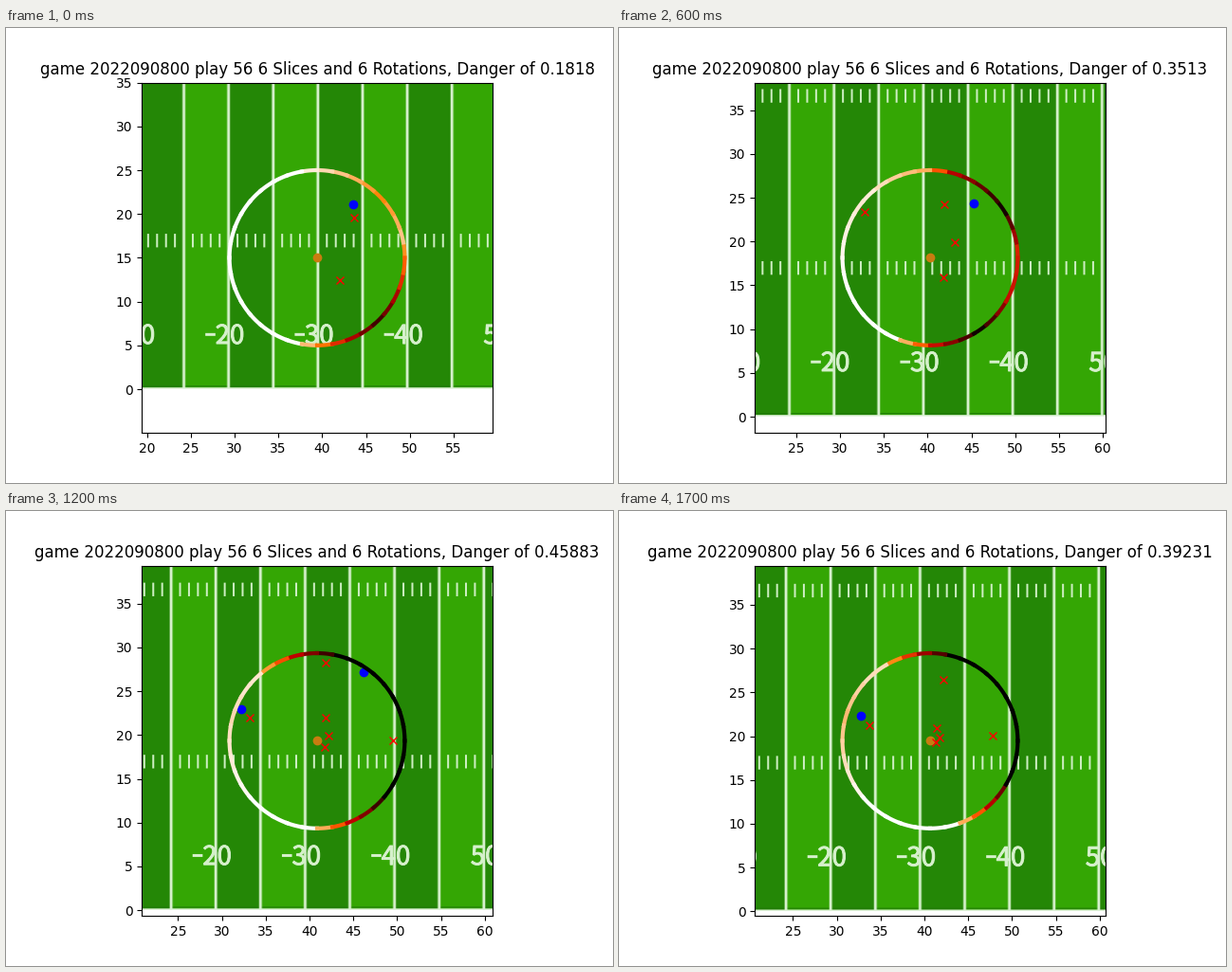
Write a matplotlib script that moves like this. It is 640 px wide and 480 px high and loops after 1800 ms.

```python
import matplotlib.pyplot as plt
import numpy as np
from matplotlib.animation import FuncAnimation
from matplotlib.collections import LineCollection
from matplotlib.patheffects import withStroke

FRAMES, INTERVAL = 18, 100
REACH, VIEW = 10, 20
SLICES = ROTATIONS = 6
BINS = SLICES * ROTATIONS
STEP = 360 / BINS

DARK, LIGHT, CHALK = "#248706", "#34a604", "#d6f0cc"
YARD_X, YARD_GAP = 24.22, 5.098
PT = 0.72  # points per pixel at 100 dpi


def path(times, *points):
    """Values for all frames on the polynomial through a few key points."""
    coef = np.polyfit(times, np.reshape(points, (len(points), -1)), len(points) - 1)
    return np.vander(np.arange(FRAMES), len(points)) @ coef


FULL, LATE = (0, 6, 10, 17), (10, 14, 17)
carrier = path(FULL, (39.42, 15.01), (40.28, 18.14), (40.75, 19.11), (40.66, 19.48))
defenders = [
    path(FULL, (41.99, 12.49), (41.78, 15.96), (41.77, 17.95), (41.27, 19.35)),
    path(FULL, (43.66, 19.57), (43.13, 19.96), (42.5, 19.95), (41.7, 19.88)),
    path((4, 8, 14, 17), (41.85, 24.91), (41.88, 23.46), (41.73, 21.46), (41.43, 20.91)),
    path((4, 10, 17), (32.75, 23.89), (33.08, 22.43), (33.75, 21.29)),
    path(LATE, (50.29, 18.92), (48.87, 19.78), (47.82, 20.1)),
    path(LATE, (41.71, 29.28), (41.95, 27.41), (42.19, 26.48)),
]
blockers = [
    path((0, 6, 10), (43.56, 21.14), (45.28, 24.39), (45.96, 26.33)),
    path((8, 14, 17), (31.93, 23.57), (32.42, 22.71), (32.77, 22.37)),
]
danger = path((0, 4, 6, 8, 10, 14, 17),
              0.1818, 0.27853, 0.3513, 0.40815, 0.44632, 0.43824, 0.39231)


def in_reach(tracks, n):
    pts = np.array([t[n] for t in tracks])
    return pts[np.hypot(*(pts - carrier[n]).T) < REACH]


def ring_values(pts, center):
    """Mean threat over all rotated slices that cover each arc."""
    values = np.zeros(BINS)
    for dx, dy in pts - center:
        threat = 1 / (1 + (np.hypot(dx, dy) / 4.95) ** 5)
        home = int(np.degrees(np.arctan2(dy, dx)) % 360 // STEP)
        gap = np.abs(np.arange(BINS) - home)
        gap = np.minimum(gap, BINS - gap)
        values += threat * np.clip(1 - gap / ROTATIONS, 0, 1)
    return np.minimum(values, 1)


def chalk_lines(ax, x, low, high, width, **style):
    ax.vlines(x, low, high, lw=width * PT, zorder=0.5, **style).set_snap(False)


def draw_field(ax):
    bottom, top = 0.12, 42
    for k in range(-2, 9):
        x = YARD_X + k * YARD_GAP
        ax.fill_between([x, x + YARD_GAP], bottom, top, lw=0, zorder=0,
                        color=DARK if k % 2 else LIGHT)
        chalk_lines(ax, x, bottom, top, 4.2, color=CHALK, alpha=0.3)
        chalk_lines(ax, x, bottom, top, 2.4, color=CHALK)
        marks = x + YARD_GAP * np.arange(1, 5) / 5
        for low in (16.2, 35.85):
            chalk_lines(ax, marks, low, low + 1.55, 2, color="#cdeec2")
    ax.axhline(0.35, color="#1f7806", lw=PT, zorder=0.4, snap=False)
    ax.axhline(0.12, color="#dcf0d6", lw=1.5 * PT, zorder=0.6, snap=False)
    for i, label in enumerate(("10", "20", "30", "40", "50")):
        x = YARD_X + (2 * i - 1) * YARD_GAP
        ax.text(x + 0.15, 5.2, label, family="Noto Sans CJK JP", size=19.8,
                color=CHALK, ha="center", va="baseline", clip_on=True, zorder=1,
                path_effects=[withStroke(linewidth=0.7, foreground=CHALK)])
        if label != "50":
            dash = ax.hlines(6.25, x - 2.65, x - 1.5, color=CHALK, lw=3 * PT, zorder=1)
            dash.set_snap(False)


fig, ax = plt.subplots(figsize=(6.4, 4.8), dpi=100)
ax.set_aspect("equal")
draw_field(ax)
ball, = ax.plot([], [], "o", color="#c87c10")
blue, = ax.plot([], [], "bo")
red, = ax.plot([], [], "rx")
ring = LineCollection([], cmap="gist_heat_r", linewidths=3,
                      capstyle="projecting", zorder=3)
ring.set_clim(0, 1)
ax.add_collection(ring, autolim=False)
title = ax.set_title("")

angles = np.radians([np.linspace(k, k + 1, 8) * STEP for k in range(BINS)])
arcs = REACH * np.stack([np.cos(angles), np.sin(angles)], axis=-1)


def update(n):
    x, y = center = carrier[n]
    ax.set_xlim(x - VIEW, x + VIEW)
    ax.set_ylim(y - VIEW, y + VIEW)
    rushers = in_reach(defenders, n)
    ball.set_data([x], [y])
    red.set_data(*rushers.T)
    blue.set_data(*in_reach(blockers, n).T)
    ring.set_segments(list(arcs + center))
    ring.set_array(ring_values(rushers, center))
    title.set_text(f"game 2022090800 play 56 {SLICES} Slices and {ROTATIONS} Rotations, "
                   f"Danger of {round(danger[n].item(), 5)}")
    return ball, red, blue, ring, title


anim = FuncAnimation(fig, update, frames=FRAMES, interval=INTERVAL, repeat=True)
plt.show()
```
